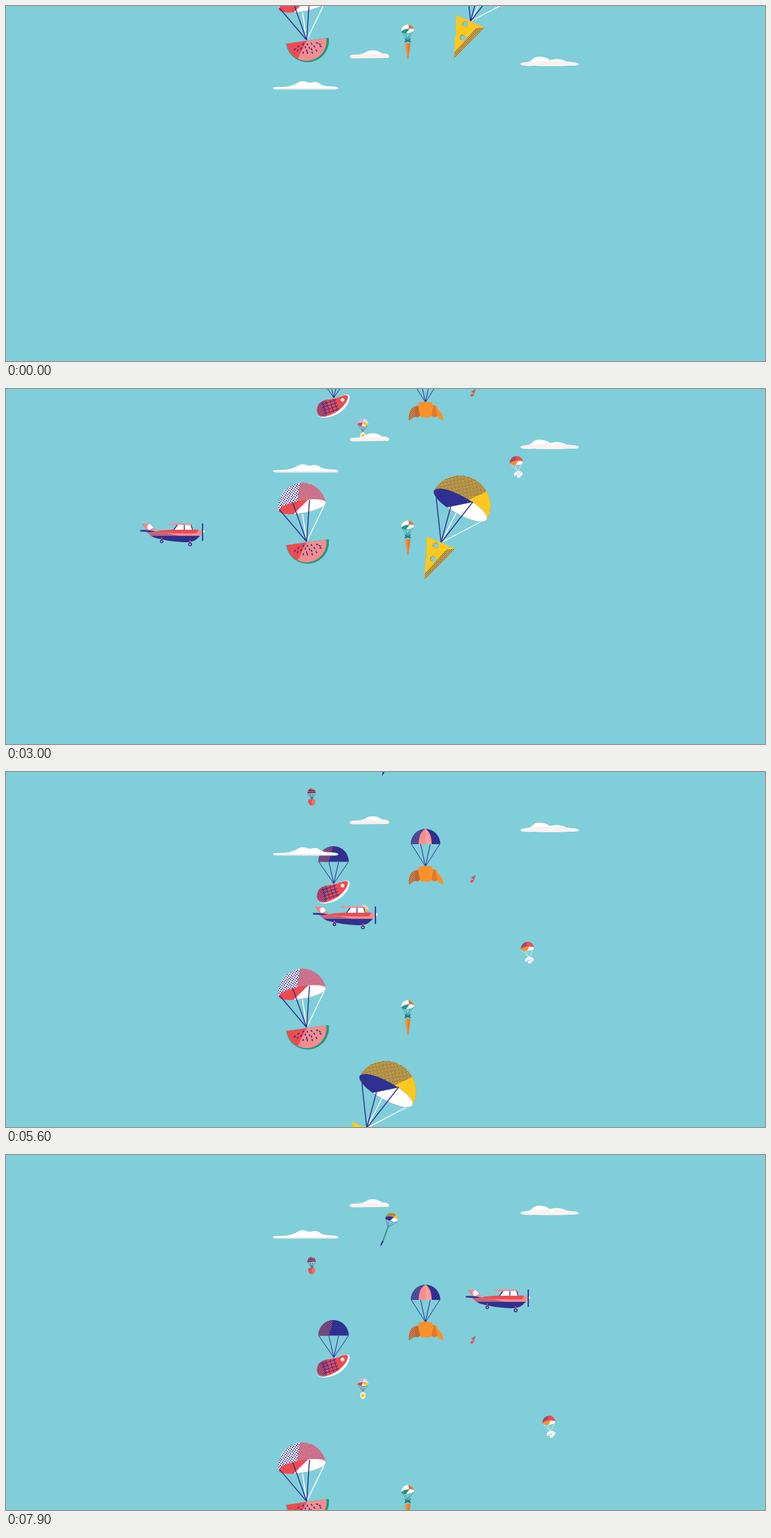
Recreate the animation shown at these times as an HTML page with a canvas. Size 1093 by 512 pixels, loop 8000 ms.

```html
<!DOCTYPE html>
<html lang="en">
<head>
<meta charset="utf-8">
<title>Falling picnic</title>
<style>
html, body { margin: 0; width: 100%; height: 100%; overflow: hidden; background: #80ced9; }
canvas { display: block; width: 100%; height: 100%; }
</style>
</head>
<body>
<canvas id="stage" width="1093" height="512"></canvas>
<script>
const ctx = document.getElementById('stage').getContext('2d');
const LOOP = 8000, STEP = 100;
const sky = '#80ced9', navy = '#2e3192', red = '#ee4b50', pink = '#f58d8d', yellow = '#fec81e',
  orange = '#f7912b', brown = '#cf7b3f', green = '#2b947c', teal = '#1f7f80', white = '#fff';

// Staggered dot texture, two dots per tile
function dots(base, dot, pitch, r) {
  const k = 2, c = document.createElement('canvas'), g = c.getContext('2d');
  c.width = c.height = pitch * k;
  g.scale(k, k);
  g.fillStyle = base;
  g.fillRect(0, 0, pitch, pitch);
  g.fillStyle = dot;
  for (const p of [.25, .75]) {
    g.beginPath();
    g.arc(p * pitch, p * pitch, r, 0, 7);
    g.fill();
  }
  const pat = ctx.createPattern(c, 'repeat');
  pat.setTransform(new DOMMatrix().scale(1 / k));
  return pat;
}
const navyOnWhite = dots(white, navy, 4, .95);
const paleOnRed = dots('#e0566a', '#a9a0c4', 3, .72);
const navyOnYellow = dots(yellow, navy, 3, .72);
const redOnNavy = dots('#4a3a86', '#c2606d', 3, .72);
const paleOnNavy = dots('#3b3b94', '#8a6fa8', 3, .6);
const navyOnRed = dots('#dc4a5c', '#4b3a86', 3, .7);
const navyOnOrange = dots('#e0863a', '#8a5a5c', 3, .75);
const navyOnPink = dots('#e0707c', '#6f4a86', 3, .6);

function fill(d, color) {
  ctx.fillStyle = color;
  ctx.fill(new Path2D(d));
}
function stroke(d, color, width = 1) {
  ctx.strokeStyle = color;
  ctx.lineWidth = width;
  ctx.stroke(new Path2D(d));
}
function oval(x, y, rx, ry, color, rot = 0) {
  ctx.fillStyle = color;
  ctx.beginPath();
  ctx.ellipse(x, y, rx, ry, rot, 0, Math.PI * 2);
  ctx.fill();
}
function at(dx, dy, draw, deg = 0) {
  ctx.save();
  ctx.translate(dx, dy);
  ctx.rotate(deg * Math.PI / 180);
  draw();
  ctx.restore();
}
function clipped(d, draw) {
  ctx.save();
  ctx.clip(new Path2D(d));
  draw();
  ctx.restore();
}
// Lines from several points to one knot: "x y x y ..."
function ropes(from, x, y, color, width) {
  const n = from.split(' ');
  let d = '';
  for (let i = 0; i < n.length; i += 2) d += `M${n[i]} ${n[i + 1]}L${x} ${y}`;
  stroke(d, color, width);
}
// Shape in two colours, parted by a line from (a, -h) to (b, h2)
function halves(d, [left, right], [a, b], h, h2) {
  clipped(d, () => {
    fill('M-99-99H99V99H-99Z', left);
    fill(`M${a}${-h}L${b} ${h2}H99V${-h}Z`, right);
  });
}
// Tilted canopy: dome above, open underside in front
function chute(cx, cy, rx, ry, deg, h, dome, domeCut, skirt, skirtCut) {
  at(cx, cy, () => {
    halves(`M${-rx} 0A${rx} ${h} 0 0 1 ${rx} 0Z`, dome, domeCut, h, 0);
    halves(`M${-rx} 0A${rx} ${ry} 0 0 1 ${rx} 0A${rx} ${ry} 0 0 1 ${-rx} 0Z`, skirt, skirtCut, ry, ry);
  }, deg);
}

// Smooth curve through [time, value] points, straight beyond the ends
function track(...pts) {
  const n = pts.length - 1;
  const rate = (i, j) => (pts[j][1] - pts[i][1]) / (pts[j][0] - pts[i][0]);
  const tan = i => rate(Math.max(i - 1, 0), Math.min(i + 1, n));
  return t => {
    if (t <= pts[0][0]) return pts[0][1] + (t - pts[0][0]) * tan(0);
    if (t >= pts[n][0]) return pts[n][1] + (t - pts[n][0]) * tan(n);
    let i = 0;
    while (t > pts[i + 1][0]) i++;
    const [t0, v0] = pts[i], [t1, v1] = pts[i + 1];
    const d = t1 - t0, u = (t - t0) / d, w = 1 - u;
    return v0 * w * w * (1 + 2 * u) + v1 * u * u * (3 - 2 * u)
      + d * u * w * (w * tan(i) - u * tan(i + 1));
  };
}
const fall = (t, t0) => 57 * (t - t0);
const cheeseX = track([0, 16], [2.1, 0], [3, -26.5], [4.2, -60], [5.6, -133.5]);
const cheeseY = track([0, -105], [2.1, 0], [2.7, 67], [3, 94.5], [3.6, 179], [4.2, 231.5], [4.5, 271], [5.6, 386.5]);
const carrotY = track([0, 0], [2.1, 107], [3, 163], [4.2, 235], [5.6, 302.5], [6.9, 393.5], [7.9, 449.5]);
const croissantY = track([3, -117], [4.2, -60.5], [5.6, 0], [6.9, 59.3], [7.9, 105]);
const mushroomX = track([0, -6], [2.7, -6], [3.6, -3.5], [4.2, 0], [4.5, 1.5], [5.4, 9], [6.3, 15.5], [6.9, 23], [7.2, 27.5], [7.9, 41.5]);
const chiliY = track([3, -68.5], [4.2, 0], [5.6, 80], [6.9, 146], [7.9, 192.5]);
const appleY = track([4.2, -80], [5.6, 0], [6.9, 74], [7.9, 123.5]);
const penX = track([5.6, .5], [6.9, 0], [7.9, -1.8]);
const penY = track([5.6, -73], [6.9, 0], [7.9, 53.5]);

function cloud(d, top, bottom, shade) {
  fill(d, white);
  clipped(d, () => {
    for (let y = top; y < bottom; y += 2) stroke(`M380 ${y}H830`, shade, .9);
  });
}
function clouds() {
  cloud('M384.5 118Q386 116.3 400 116.8Q410 116 418 112Q424 107 431 109Q437 112 441 110Q448 108 453 113Q458 116 470 116Q479 116.5 478.5 119Q478 120.5 470 120.5H390Q384 120.5 384.5 118Z', 119.8, 121, '#d8cfd4');
  cloud('M495 72.5Q495 70 504 70Q513 70 518 67Q523 63 531 64Q538 65 541 68.5Q550 68 552 72Q552 75.5 546 75L500 75.5Q495 75.5 495 72.5Z', 70.5, 76, '#f7e1e1');
  cloud('M741 84Q741 81 750 81Q756 80 759 76Q764 72 772 73.5Q779 74 783 78Q794 75 802 78Q808 81 814 81Q825 81 825 84.5Q822 86.5 810 86Q783 87 760 86Q741 87 741 84Z', 80.5, 87, '#f7e1e1');
}

const seeds = [428, 175, 434, 175, 440, 174, 448, 173, 421, 178, 431, 179, 437, 180, 444, 178,
  453, 178, 416, 182, 425, 181, 433, 184, 440, 182, 447, 184, 420, 184, 428, 187, 434, 187, 441, 187, 452, 175];
function melon() {
  ropes('427 129 458 117', 433, 169, white, 1.4);
  chute(426.5, 118.5, 34.5, 9, -10, 34.5, [navyOnWhite, paleOnRed], [3, -9], [red, white], [11, -15]);
  ropes('394 123 413 113 437 109', 433, 169, navy, 1.4);
  fill('M403.3 174L464.8 165.5A31 31 0 0 1 403.3 174Z', green);
  const flesh = 'M404.3 173.9L461.3 166A28.5 28.5 0 0 1 404.3 173.9Z';
  fill(flesh, pink);
  clipped(flesh, () => fill('M400 160H434L433 170L418 200H400Z', red));
  // Seeds point away from the middle of the cut
  for (let i = 0; i < seeds.length; i += 2) {
    const x = seeds[i], y = seeds[i + 1];
    oval(x, y, 1.9, .85, navy, Math.atan2(y - 166, x - 434));
  }
}

function cheese() {
  ropes('676 82 718 93', 653, 127, white, 1.4);
  chute(680.8, 73, 43.5, 13, 29, 42.5, [navyOnYellow, yellow], [29, -3], [navy, white], [14, -16]);
  ropes('646 62 667 75 699 68', 653, 127, navy, 1.4);
  fill('M632 118L673 136L629 181L630.5 151Q633.5 147 631.5 139Q633 134 632 118Z', yellow);
  fill('M673 136L661 137L630 171L629 181Z', navyOnYellow);
  for (const [x, y] of [[645, 131], [641.5, 150.3]]) {
    oval(x, y, 4.3, 4.3, navyOnYellow);
    oval(x + .6, y + .4, 3.7, 3.7, sky);
  }
}

function carrot() {
  ropes('570 37.5 575 39 582 38 588 35', 578.5, 48, teal, .6);
  chute(578.7, 36, 9.4, 3.2, -8, 9.4, [white, brown], [2, 2], [green, white], [3, -3]);
  fill('M574.5 55Q578.5 51 582.5 55L579 77H578Z', orange);
  fill('M578.5 53Q581 53 582.5 55L579 77H578.5Z', '#dd7d36');
  fill('M574 45.8L578.5 48.8L583 45.8L582 49.5L583 53L578.5 51.2L574 53L575 49.5Z', teal);
}

function steak() {
  const dome = 'M449.7 49.7A22 22.5 0 0 1 493.7 49.7Z';
  fill(dome, navy);
  clipped(dome, () => fill('M440 20H472Q470 37 464 50H440Z', redOnNavy));
  ropes('450.5 50 465 50 479 50 493 50', 472, 81, navy, 1);
  fill('M450 92C455 82 470 84 480 80C486 77 493 75 494.5 79C496 86 489 98 478 104C469 109 458 111.5 451 108.5C446 105 447 98 450 92Z', white);
  const meat = 'M449.5 92C455 82 469 84 479 80.5C485 77.5 491 76 492.5 79C493 85 486 95 476 101.5C467 107 457 110 451 107.5C446.5 104 447 97 449.5 92Z';
  fill(meat, red);
  clipped(meat, () => {
    fill('M440 70H464Q460 92 462 115H440Z', navyOnRed);
    stroke('M448 94Q444 110 462 108.5', '#9a8fbd', 1.6);
  });
  at(466.5, 94, () => {
    for (const p of [-1.5, -.5, .5, 1.5]) stroke(`M-11.5 ${p * 4.6}H11.5M${p * 5.6}-9V9`, navy, .9);
  }, -18);
  oval(484.7, 84, 2.6, 2.6, white);
}

function croissant() {
  const dome = 'M583 104A21.2 22 0 0 1 625.4 104Z';
  fill(dome, navy);
  clipped(dome, () => fill('M580 80H604Q597 85 594 104H580Z', paleOnNavy));
  fill('M604 82Q595 86 594 104H613Q613 87 604 82Z', pink);
  fill('M604 82Q610 90 612.5 104H604Z', '#f8a09c');
  ropes('583.7 104 597 104 611 104 624.7 104', 604, 136, navy, 1);
  // Curled ends, inner folds, then the middle roll
  fill('M592 141Q583 142 580.5 153Q579 159 580.5 162.5Q584 159 590 157Z', navyOnOrange);
  fill('M589.5 143L596 140L597.5 154L593 158L589 157Z', '#c0662f');
  fill('M615 140L621 142Q622 148 627 151Q630 157 629.5 162.5Q625 161 622 157.5L614 155Z', orange);
  fill('M613 140L618 141L621.5 156L616 158L611 154Z', '#e07a2c');
  fill('M594.5 136.5Q604 134.5 613.5 136.5L615 142L612.5 157Q604 159.5 596.5 157L593.5 142Z', orange);
}

function plane() {
  fill('M109.5 194H121L130 204.5H117Z', pink);
  fill('M116 198L121 194.5L126 200L119 204Z', white);
  stroke('M111 195l7 8M115 196l3 4', '#e0616b', .8);
  // Body stripes, top to bottom
  const body = 'M116 206Q128 206 136 204L155 202.8H189Q196 203.5 197 206.5Q194 212 188 217Q183 221 172 221Q148 220 128 214.5Q120 211 116 206Z';
  fill(body, pink);
  clipped(body, () => {
    fill('M138 202H192L188 208Q158 209 122 206Z', red);
    fill('M116 206L146 208L164 212L122 213Z', navyOnPink);
    fill('M116 211.7H200V225H116Z', navy);
  });
  fill('M155 203L161 195H180.5L183.5 203Z', white);
  stroke('M155.5 203L161 195.5M170.5 195V203M180 195.5L182.5 203', navy, 1.3);
  fill('M147 194Q162 193 183 194.5V196H149Z', pink);
  fill('M107 203.5Q118 202.5 129 205.5Q126 207 107 205.5Z', navy);
  stroke('M138 214V218M179 218V223', red, 1.4);
  for (const [x, y, r] of [[138, 219.7, 2.5], [179, 224, 2.8]]) {
    oval(x, y, r, r, navy);
    oval(x, y, r * .42, r * .42, '#f4c3cb');
  }
  oval(198.2, 205.5, 1.8, 2, white);
  stroke('M197 194V219', navy, 1.8);
}

function egg() {
  ropes('507 121 512 122 516 122 521 121', 514, 130, '#83647d', .7);
  chute(514, 119.7, 8, 2.7, 3, 8.5, ['#c8bcd8', '#e2dbe0'], [1, -1], ['#cb504f', yellow], [2, 0]);
  fill('M512 122L514 117L517.5 122Z', white);
  oval(514, 136, 3.9, 5, '#fff4dd');
  oval(514, 136, 2.4, 2.6, yellow);
}

function mushroom() {
  ropes('732 177 738 178 749 174', 743, 188, '#e9f3f5', .7);
  chute(740.5, 175, 9.5, 3.1, -5, 9.8, ['#a2466b', red], [0, -3], [orange, white], [3, -1]);
  fill('M737 192Q738 187 744 187Q749 187 749.5 191Q749 194 746 193.5L746.5 196L742 196.5L741.5 193.5Q737 195 737 192Z', white);
  stroke('M739 193L746 191M742 189h1.5M746 189h1', '#9b9cc6', .8);
}

function chili() {
  oval(673.3, 72, 2.8, 1.7, red, -.5);
  oval(671.2, 77.3, 2.7, 1.8, red, -.5);
  stroke('M674.5 70.5l1.2-2M673 75.5l1.5-1.5', green, 1.1);
  stroke('M670 71.5l2 2', '#8b5a7c', .8);
}

function apple() {
  const dome = 'M433.9 31.5A6.2 8 0 0 1 446.3 31.5Z';
  ropes('434.5 31 438 31 442 31 446 31', 440, 39, navy, .5);
  fill(dome, '#e3743f');
  clipped(dome, () => {
    fill('M433 23H440V26H433Z', '#a2546c');
    stroke('M433 26.7H448M433 29.6H448', navy, 1.5);
    stroke('M440 31.1H448', '#f7d6cc', .9);
  });
  fill('M440 39.5Q443 37.5 445.2 40.5Q446 45 442 48.3H438.5Q434.5 45 435 41Q437 37.8 440 39.5Z', red);
  fill('M440.5 39.5Q443 37.5 445.2 40.5Q446 45 442 48.3H440.5Z', '#f3716f');
  stroke('M440 40L442.5 37', green, 1.3);
}

function pen() {
  ropes('548.5 38 553 42 559 43 565 43', 551.8, 51, '#3d5a94', .6);
  chute(557, 38.8, 9.2, 3.2, 12, 8.8, ['#b9853f', yellow], [6, 1], [navy, white], [3, -2]);
  stroke('M551.6 51.5L544.5 71', green, 1.8);
  fill('M543.5 70L545.5 71L543.4 75.5L541.2 78.5L541.4 75Z', navy);
}

function draw(t) {
  ctx.fillStyle = sky;
  ctx.fillRect(0, 0, 1093, 512);
  at(0, chiliY(t), chili);
  at(0, appleY(t), apple);
  at(0, fall(t, 4.2), egg);
  at(0, fall(t, 4.2), steak);
  at(0, 0, clouds);
  at(mushroomX(t), fall(t, 4.2), mushroom);
  at(penX(t), penY(t), pen);
  at(95.7 * (t - 2.1), 0, plane);
  at(0, carrotY(t), carrot);
  at(0, croissantY(t), croissant);
  at(0, fall(t, 2.1), melon);
  at(cheeseX(t), cheeseY(t), cheese);
}

const start = performance.now();
function tick() {
  const ms = (performance.now() - start) % LOOP;
  draw(Math.floor(ms / STEP) * STEP / 1000);
  requestAnimationFrame(tick);
}
tick();
</script>
</body>
</html>
```
